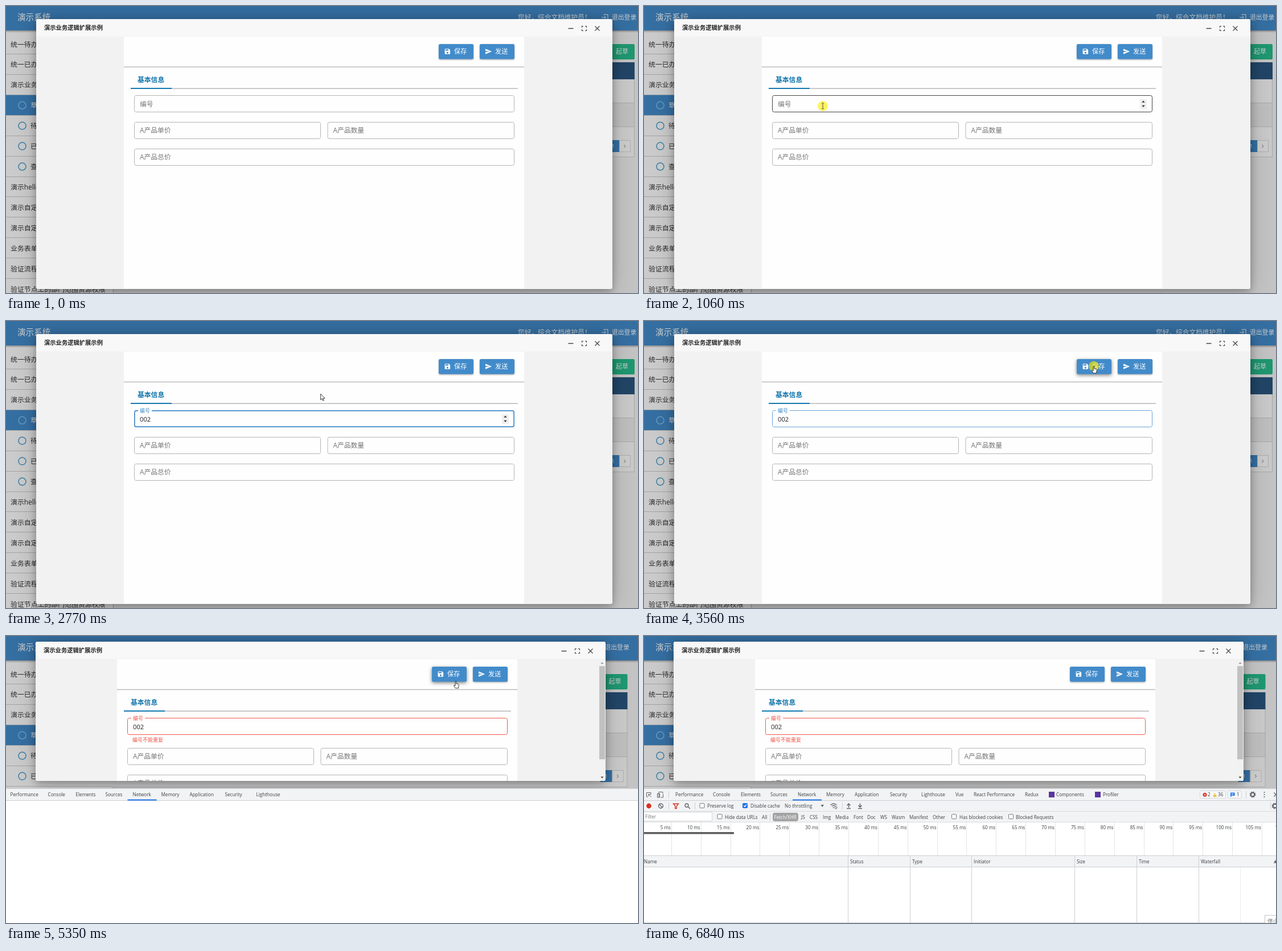
These frames come from a looping animation (1110 px wide and 505 px high, 6.92 s). An HTML page:

```html
<!DOCTYPE html>
<html>
<head>
<meta charset="utf-8">
<title>Form demo</title>
<style>
  html, body { margin: 0; width: 100%; height: 100%; overflow: hidden; background: #fff; }
  #stage { position: relative; width: 1110px; height: 505px; overflow: hidden; }
  svg { position: absolute; left: 0; top: 0; display: block; }
  text { font-family: "Open Sans", "Noto Sans CJK SC", "Noto Sans CJK", sans-serif; white-space: pre; }
  #shade { position: absolute; inset: 0; background: rgba(0, 0, 0, .2); }
  #modal {
    position: absolute; left: 53px; top: 23px; width: 1012px; height: 475px;
    overflow: hidden; border-radius: 3px; background: #f2f2f2;
    box-shadow: 0 4px 14px rgba(0, 0, 0, .3), 0 0 40px rgba(0, 0, 0, .18);
  }
  #modal.small { left: 52px; top: 10px; width: 1001px; height: 245px; }
  #modal svg { left: -53px; top: -23px; }
  .btn { filter: drop-shadow(0 1px 1.5px rgba(0, 0, 0, .35)); }
  .btn.hover { filter: drop-shadow(0 2px 3px rgba(0, 0, 0, .5)); }
</style>
</head>
<body>
<div id="stage">
  <svg id="page" width="1110" height="505"></svg>
  <div id="shade"></div>
  <div id="modal"><svg id="form" width="1110" height="505"></svg></div>
  <svg id="tools" width="1110" height="505" data-on="5350-6920"></svg>
  <svg id="pointer" width="1110" height="505"></svg>
</div>
<script>
const LOOP = 6920, DOCK = 5350, ERROR = 3860;
const $ = id => document.getElementById(id);
const text = (x, y, size, str, fill = '#333', more = '') =>
  `<text x="${x}" y="${y}" font-size="${size}" fill="${fill}" ${more}>${str}</text>`;
const rect = (x, y, w, h, fill, more = '') =>
  `<rect x="${x}" y="${y}" width="${w}" height="${h}" fill="${fill}" ${more}/>`;
const path = (d, more) => `<path d="${d}" ${more}/>`;
const line = (d, color, w = 1, more = '') =>
  path(d, `fill="none" stroke="${color}" stroke-width="${w}" ${more}`);
const BLUE = '#428bca', RED = '#f4564a';

// Page behind the dialog
function buildPage() {
  const items = ['统一待办', '统一已办', '演示业务逻辑扩展示例', '草稿', '待办', '已办', '查询',
    '演示hello', '演示自定义页面', '演示自定义组件', '业务表单', '验证流程', '验证节点上的部门范围资源权限'];
  let s = rect(0, 0, 1110, 505, '#f4f4f4') + rect(0, 43, 188, 462, '#fdfdfd');
  items.forEach((name, i) => {
    const y = 67 + i * 35.92, sub = i > 2 && i < 7, picked = i === 3;
    if (picked) s += rect(0, y - 18, 188, 36, BLUE);
    if (sub) s += `<circle cx="28.5" cy="${y}" r="6.5" fill="none" stroke="${picked ? '#7fc0ee' : '#4a9fd4'}" stroke-width="1.5"/>`;
    s += text(sub ? 43 : 8, y + 4.5, 11.9, name, picked ? '#fff' : '#333');
    s += line(`M0 ${Math.round(y + 17) + .5}H188`, '#ccc');
  });
  s += line('M188.5 43V505', '#bbb');
  s += rect(0, 43, 1110, 4, 'url(#fall)') + rect(0, 0, 1110, 43, BLUE);
  s += text(20, 25, 14.6, '演示系统', '#fff');
  s += '<g id="right">' +
    text(899, 24, 11.7, '您好，综合文档维护员！', '#fff') +
    line('M1050 16V15H1057V25H1050V24M1046 20H1053M1051 17.5L1053.5 20L1051 22.5', '#fff') +
    text(1064, 24, 10.8, '退出登录', '#fff') +
    rect(1040, 67, 64, 27, '#27bd8c', 'rx="2"') + text(1071, 84, 11, '起草', '#fff') +
    rect(200, 99, 904, 167, '#fbfbfb') + rect(200, 99, 904, 30, '#2a5680') +
    rect(200, 170, 904, 42, '#ededed') +
    line('M200 170.5H1104M200 212.5H1104M200 265.5H1104M1103.5 129V266', '#d2d2d2') +
    rect(1056, 236, 21, 21, BLUE) + text(1064, 250, 9, '1', '#fff') +
    rect(1077.5, 236.5, 19, 20, '#fff', 'stroke="#d8d8d8"') +
    line('M1085.5 244L1088 246.7L1085.5 249.5', '#777') + '</g>';
  $('page').innerHTML = '<defs><linearGradient id="fall" x2="0" y2="1"><stop stop-opacity=".3"/><stop offset="1" stop-opacity="0"/></linearGradient></defs>' + s;
}

// Dialog with the form
const box = (x, y, w, color = '#b4b4b4', thick = 1, on = '') =>
  rect(x + thick / 2, y + thick / 2, w - thick, 30 - thick, 'none',
    `rx="3" stroke="${color}" stroke-width="${thick}" ${on && `data-on="${on}"`}`);
const field = (x, y, w, label) => box(x, y, w) + text(x + 10, y + 19.3, 11.8, label, '#757575');

function buildForm() {
  const save = 'M17 3H5a2 2 0 0 0-2 2v14a2 2 0 0 0 2 2h14a2 2 0 0 0 2-2V7zM12 19a3 3 0 1 1 0-6a3 3 0 0 1 0 6zM15 9H5V5h10z';
  const send = 'M2 21L23 12L2 3V10L17 12L2 14z';
  const button = (id, x, icon, label) =>
    `<g id="${id}" class="btn">` + rect(x, 67, 61, 26.5, BLUE, 'rx="2.5"') +
    path(icon, `fill="#fff" fill-rule="evenodd" transform="translate(${x + 9} 73.7) scale(.53)"`) +
    text(x + 27, 84.2, 11.2, label, '#fff', 'font-weight="500"') + '</g>';

  $('form').innerHTML =
    rect(53, 23, 1012, 30.5, '#f8f8f8') +
    text(67, 42.3, 10.3, '演示业务逻辑扩展示例', '#222', 'font-weight="700"') +
    '<g id="content">' +
    line('M987.5 39.5H996.5', '#444', 1.3) +
    line('M1011.5 38V35.5H1014M1017 35.5H1019.5V38M1019.5 41V43.5H1017M1014 43.5H1011.5V41', '#444', 1.2) +
    line('M1034.5 35.5L1042.5 43.5M1042.5 35.5L1034.5 43.5', '#444', 1.2) +
    rect(207, 54, 703, 443, '#fefefe') +
    button('save', 760, save, '保存') + button('send', 832, send, '发送') +
    rect(207, 106.5, 703, 1.6, '#c0c0c0') +
    text(231, 134, 11.8, '基本信息', '#0f74ab', 'font-weight="700"') +
    rect(219, 144.4, 680, 1.6, '#bcbcbc') + rect(219, 144, 72, 2, '#1479b0') +
    box(225, 157, 668, '#b4b4b4', 1, '0-850') +
    box(225, 157, 668, '#444', 1, '850-1150') +
    box(225, 157, 668, BLUE, 1.7, '1150-3560') +
    box(225, 157, 668, '#6aa5d8', 1, '3560-' + ERROR) +
    box(225, 157, 668, RED, 1, ERROR + '-6920') +
    rect(232, 156, 24, 4, '#fefefe', 'data-on="1150-6920"') +
    text(0, 0, 11.8, '编号', '#757575', 'id="label"') +
    text(235, 177, 11.2, '', '#222', 'id="value"') +
    rect(235, 165, 1, 15, '#222', 'id="caret"') +
    '<g data-on="850-3560">' + rect(871, 164, 12, 17, '#efefef') +
    path('M874.3 169.8L877 166.5L879.7 169.8zM874.3 174.8L877 178.1L879.7 174.8z', 'fill="#333"') + '</g>' +
    text(234, 199, 9, '编号不能重复', RED, `data-on="${ERROR}-6920"`) +
    '<g id="below">' + field(225, 204, 328, 'A产品单价') + field(564.5, 204, 328.5, 'A产品数量') +
    field(225, 251, 668, 'A产品总价') + '</g></g>' +
    `<g data-on="${DOCK}-6920">` + rect(1043, 54, 11, 214, '#f1f1f1') + rect(1043, 66, 10, 164, '#c1c1c1') +
    path('M1045.5 62L1048 59L1050.5 62z', 'fill="#999"') +
    path('M1045.5 260.5L1048 263.5L1050.5 260.5z', 'fill="#444"') + '</g>';
}

// Developer tools panel
function buildTools() {
  const S = 8.15, INK = '#3c4043', GRAY = '#5f6368', RULE = '#cdcfd3';
  const row = (y, list) => list.map(([x, str]) => text(x, y, S, str, INK)).join('');
  const check = (x, y, on) => rect(x - 4, y - 4, 8, 8, on ? '#1a73e8' : '#fff', `rx="1.2" stroke="${on ? '#1a73e8' : '#777'}"`) +
    (on ? line(`M${x - 2.3} ${y}L${x - .5} ${y + 2}L${x + 2.5} ${y - 2}`, '#fff', 1.3) : '');
  const gear = (x, y) => `<circle cx="${x}" cy="${y}" r="3.2" fill="none" stroke="${GRAY}" stroke-width="2"/>` +
    `<circle cx="${x}" cy="${y}" r="4.7" fill="none" stroke="${GRAY}" stroke-width="1.5" stroke-dasharray="2 1.69"/>`;
  const loaded = inner => `<g data-on="5430-6920">${inner}</g>`;
  const table = inner => `<g data-on="5670-6920">${inner}</g>`;
  const late = inner => `<g data-on="6540-6920">${inner}</g>`;

  let s = rect(0, 269, 1110, 236, '#fff') + rect(0, 269, 1110, 21, '#f2f3f4') +
    line('M0 268.5H1110M0 289.5H1110', RULE);
  s += '<g id="tabs">' + row(282.3, [[55, 'Performance'], [121, 'Console'], [170, 'Elements'], [222, 'Sources'],
    [270, 'Network'], [320, 'Memory'], [370, 'Application'], [432, 'Security'], [487, 'Lighthouse']]) +
    rect(261, 287.5, 51, 2, '#1a73e8') + '</g>';

  s += loaded(
    line('M12 279V275.5H4.5V283H7M8 278.5L13 283.5M8 278.5V282M8 278.5H11.5', GRAY) +
    line('M26 283.5V274.5H33V277M23.5 277.5H27.5V284H23.5zM29 284H33.5V278', GRAY) +
    line('M43.5 273V286', RULE) +
    rect(0, 290, 1110, 38, '#f2f3f4') + line('M0 308.5H1110M0 327.5H1110', '#d9dbde') +
    '<circle cx="8.5" cy="299" r="4.4" fill="#d93025"/>' +
    '<circle cx="29.5" cy="299" r="4" fill="none" stroke="#5f6368" stroke-width="1.4"/>' + line('M26.7 296.2L32.3 301.8', GRAY, 1.4) +
    line('M51.5 295.2H60.5L57.2 299V303.5H54.8V299z', '#d93025', 1.4) +
    '<circle cx="75" cy="298" r="3" fill="none" stroke="#5f6368" stroke-width="1.3"/>' + line('M77.2 300.2L81 304', GRAY, 1.4) +
    line('M43.5 293V305M89.5 293V305M348.5 293V305M1100.5 293V305', RULE) +
    check(102, 298.5) + check(177.5, 298.5, true) +
    row(302, [[111, 'Preserve log'], [187, 'Disable cache'], [247, 'No throttling']]) +
    path('M310.5 297L316 297L313.2 301z', `fill="${GRAY}"`) +
    line('M327.5 297.5Q333 292.5 338.5 297.5M329.7 299.7Q333 297 336 299.2M331.8 301.8L333.5 302', GRAY, 1.3) +
    `<circle cx="337" cy="302" r="2" fill="none" stroke="${GRAY}"/>` +
    line('M359.5 302V295.5M356.5 298.3L359.5 295L362.5 298.3M356 303.5H363M379.5 294.5V301M376.5 298L379.5 301.3L382.5 298M376 303.5H383', GRAY, 1.4) +
    gear(1108, 299) +
    rect(-1, 310, 120.5, 15.5, '#fff', 'stroke="#d5d7da"') + text(2, 321, S, 'Filter', '#777') +
    check(133, 317.7) + check(544.5, 317.7) + check(644.5, 317.7) +
    rect(226, 311, 45, 15, '#a3a3a3', 'rx="4"') + text(228.5, 321.8, S, 'Fetch/XHR', '#fff') +
    line('M221.5 313V325', RULE) +
    row(321.5, [[142, 'Hide data URLs'], [207, 'All'], [276, 'JS'], [291, 'CSS'], [314, 'Img'], [336, 'Media'],
      [368, 'Font'], [392, 'Doc'], [415, 'WS'], [435, 'Wasm'], [466, 'Manifest'], [507, 'Other'],
      [554, 'Has blocked cookies'], [653, 'Blocked Requests']]) +
    gear(1069, 279) + [275, 279, 283].map(y => `<circle cx="1089.5" cy="${y}" r="1.1" fill="${GRAY}"/>`).join('') +
    line('M1057.5 273V286', RULE) + line('M1106.5 275.5L1113 282.5M1106.5 282.5L1113 275.5', GRAY, 1.3));

  let ruler = '';
  for (let i = 1; i <= 22; i++) {
    const x = 48.4 + (i - 1) * 51.85;
    ruler += line(`M${Math.floor(x) + .5} 328V386`, '#e4e4e4') +
      text(x - 1.5, 339.8, S, i * 5 + ' ms', INK, 'text-anchor="end"');
  }
  const cols = [358.5, 467.5, 575.5, 756.5, 865.5, 974.5];
  s += table(ruler + rect(0, 387, 1110, 20, '#f1f3f4') + line('M0 386.5H1110M0 406.5H1110M0 504.5H1110', RULE) +
    line(cols.map(x => `M${x} 387V504`).join(''), RULE) + line('M1047.5 407V504', '#ececec') +
    row(400, [[0, 'Name'], [362, 'Status'], [471, 'Type'], [579, 'Initiator'], [760, 'Size'], [869, 'Time'], [978, 'Waterfall']]) +
    path('M1106 399.5L1109 394L1112 399.5z', `fill="${GRAY}"`));

  s += late(row(282.3, [[547, 'Vue'], [579, 'React Performance'], [669, 'Redux'], [724, 'Components'], [806, 'Profiler']]) +
    rect(711, 274, 10, 10, '#5a35a0') + rect(792, 274, 10, 10, '#5a35a0') +
    rect(976.5, 272.5, 45, 13, '#f6f7f8', 'rx="2" stroke="#d5d7da"') +
    '<circle cx="985" cy="279.3" r="3.5" fill="#d93025"/>' + line('M983.7 278L986.3 280.6M986.3 278L983.7 280.6', '#fff') +
    path('M999 282.8L1002.5 276L1006 282.8z', 'fill="#e8b923"') + rect(1002, 278.3, 1, 2.4, '#fff') +
    row(282.3, [[990, '2'], [1008, '36']]) +
    rect(1025.5, 272.5, 24, 13, '#f6f7f8', 'rx="2" stroke="#d5d7da"') +
    path('M1030 275.5H1037.5V281H1032.5L1030 283.5z', 'fill="#1a73e8"') + line('M1031.5 277.3H1036M1031.5 279.3H1035', '#fff', .8) +
    text(1041, 282.3, S, '1', INK) +
    rect(0, 345, 158, 3.5, '#5c5c5c'));
  s += '<g data-on="6840-6920">' + rect(1090.5, 491.5, 30, 20, '#fff', 'stroke="#c4c4c4"') + text(1095, 504.8, 9.5, '停止', '#777') + '</g>';
  $('tools').innerHTML = s;
}

function buildPointer() {
  const edge = 'stroke="#222" stroke-width=".9" stroke-linejoin="round"';
  $('pointer').innerHTML = '<circle id="glow" r="9" fill="#ffeb00" fill-opacity=".62"/><g id="mouse">' +
    path('M0 0V10.5L2.4 8.3L4 12L5.6 11.3L4 7.7H7.5z', `id="arrow" fill="#fff" ${edge}`) +
    line('M-2 -5H-.6L0 -4.4L.6 -5H2M0 -4.4V4.4M-2 5H-.6L0 4.4L.6 5H2', '#444', 1, 'id="beam"') +
    path('M-.9 .3Q0 -.8 .9 .3V4.4L4.6 5.2Q5.6 5.6 5.4 7L4.4 12.3H-.6L-3.6 8Q-3.4 6.6 -2 7.2L-.9 8.2z', `id="hand" fill="#fff" ${edge}`) +
    '</g>';
}

buildPage(); buildForm(); buildTools(); buildPointer();

const timed = [...document.querySelectorAll('[data-on]')].map(el => [el, ...el.dataset.on.split('-').map(Number)]);
const route = [[70, 1012, 484], [750, 334, 190], [850, 322, 180], [990, 314, 176], [2460, 314, 176],
  [3080, 789, 81], [3160, 790, 79.5], [5670, 790, 79.5], [6290, 1093, 501]];
const within = (t, a, b) => t >= a && t < b;
const show = (el, on) => { el.style.display = on ? '' : 'none'; };
const clamp = v => Math.max(0, Math.min(1, v));
const move = (id, x, y) => $(id).setAttribute('transform', `translate(${x} ${y})`);

function mouseAt(t) {
  let i = 0;
  while (i < route.length - 2 && t >= route[i + 1][0]) i++;
  const [a, x, y] = route[i], [b, u, v] = route[i + 1];
  let k = clamp((t - a) / (b - a));
  if (b - a > 500) k = k * k * (3 - 2 * k);
  return [x + (u - x) * k, y + (v - y) * k];
}

function render(t) {
  const docked = t >= DOCK;
  for (const [el, a, b] of timed) show(el, within(t, a, b));
  $('modal').classList.toggle('small', docked);
  move('content', docked ? -11 : 0, 0);
  move('right', docked ? -12.5 : 0, 0);
  move('below', 0, t >= ERROR ? 6 : 0);
  move('tabs', t < 5430 ? -47.5 : 0, 0);

  // Floating label
  const k = clamp((t - 1070) / 200), e = 1 - (1 - k) ** 3;
  const label = $('label');
  label.setAttribute('transform', `translate(235 ${176.5 - 15.7 * e}) scale(${1 - .24 * e})`);
  label.setAttribute('fill', t < 1150 ? '#757575' : t < ERROR ? BLUE : RED);

  // Typing and caret
  const count = [1850, 2000, 2230].filter(at => t >= at).length;
  $('value').textContent = '002'.slice(0, count);
  $('caret').setAttribute('x', 235 + 6.4 * count);
  show($('caret'), within(t, 1070, 1600) || within(t, 1850, 2760) || within(t, 3310, 3560));

  // Pointer
  const [x, y] = mouseAt(t);
  const onSave = x > 760 && x < 821 && y < 94;
  const kind = onSave ? 'hand' : within(y, 157, 187) && x < 893 && t < DOCK ? 'beam' : 'arrow';
  for (const id of ['arrow', 'beam', 'hand']) show($(id), id === kind);
  show($('mouse'), within(t, 70, 6370));
  move('mouse', x, y);
  $('save').classList.toggle('hover', onSave);
  move('glow', x, y);
  show($('glow'), within(t, 1060, 1290) || within(t, 3560, 3780));
}

const start = performance.now();
function tick() {
  render((performance.now() - start) % LOOP);
  requestAnimationFrame(tick);
}
tick();
</script>
</body>
</html>
```
